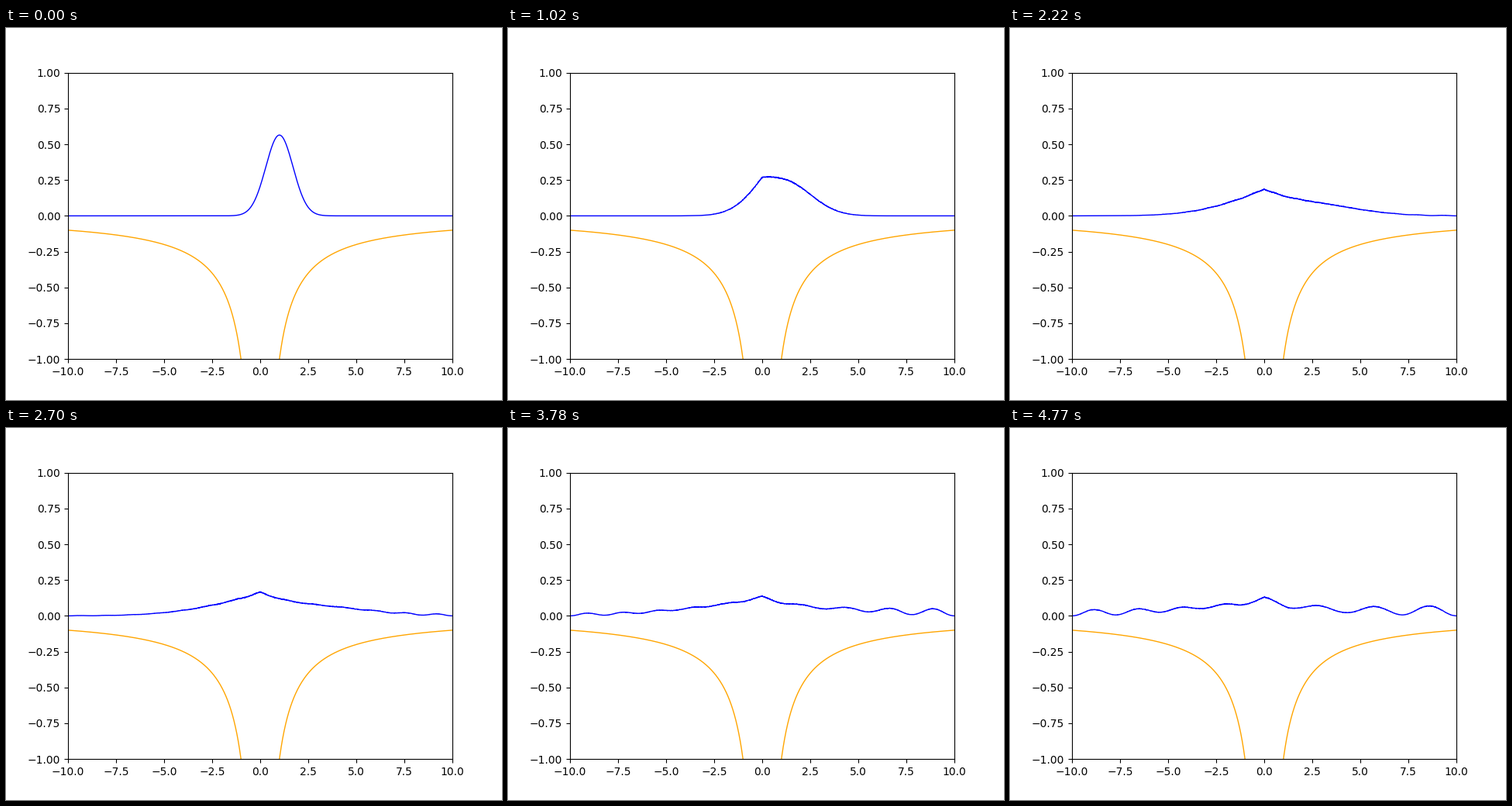
Write a matplotlib script that moves like this. It is 640 by 480 pixels and loops after 4800 ms.

```python
import numpy as np
import matplotlib.pyplot as plt
from matplotlib.animation import FuncAnimation

FRAMES = 160
INTERVAL = 30      # ms
DT = 0.05          # simulated time per frame
HALF = 10.0        # walls at -HALF and HALF
MODES = 400
PULL = 0.155       # strength of the point attraction at x = 0
GRAIN = 0.0017     # fine ripple on the wave function

x = np.linspace(-HALF, HALF, 2000)


def box_modes(pos):
    """Standing waves of the box, one column per mode."""
    n = np.arange(1, MODES + 1)
    phase = np.outer(np.atleast_1d(pos) + HALF, n * np.pi / (2 * HALF))
    return np.sin(phase) / np.sqrt(HALF)


def solve():
    """Densities for all frames: a Gaussian packet in a box with an attractor."""
    basis = box_modes(x)
    centre = box_modes(0.0)[0]
    k = np.arange(1, MODES + 1) * np.pi / (2 * HALF)
    energy, states = np.linalg.eigh(np.diag(k**2 / 2) - PULL * np.outer(centre, centre))

    packet = np.pi**-0.25 * np.exp(-(x - 1)**2 / 2)
    coeffs = states.T @ (basis.T @ packet) * (x[1] - x[0])
    t = np.arange(FRAMES) * DT
    psi = (basis @ states) @ (coeffs[:, None] * np.exp(-1j * np.outer(energy, t)))

    rng = np.random.default_rng(4)
    grain = rng.normal(size=psi.shape) + 1j * rng.normal(size=psi.shape)
    psi += GRAIN * np.minimum(t, 1) * grain
    return np.abs(psi)**2


density = solve()

fig, ax = plt.subplots(figsize=(6.4, 4.8), dpi=100)
ax.set_xlim(-HALF, HALF)
ax.set_ylim(-1, 1)
wave, = ax.plot(x, density[:, 0], color="blue", lw=1)
ax.plot(x, -1 / np.abs(x), color="orange", lw=1)


def update(i):
    wave.set_ydata(density[:, i])
    return wave,


anim = FuncAnimation(fig, update, frames=FRAMES, interval=INTERVAL,
                     repeat=True, repeat_delay=0, blit=False)
plt.show()
```
